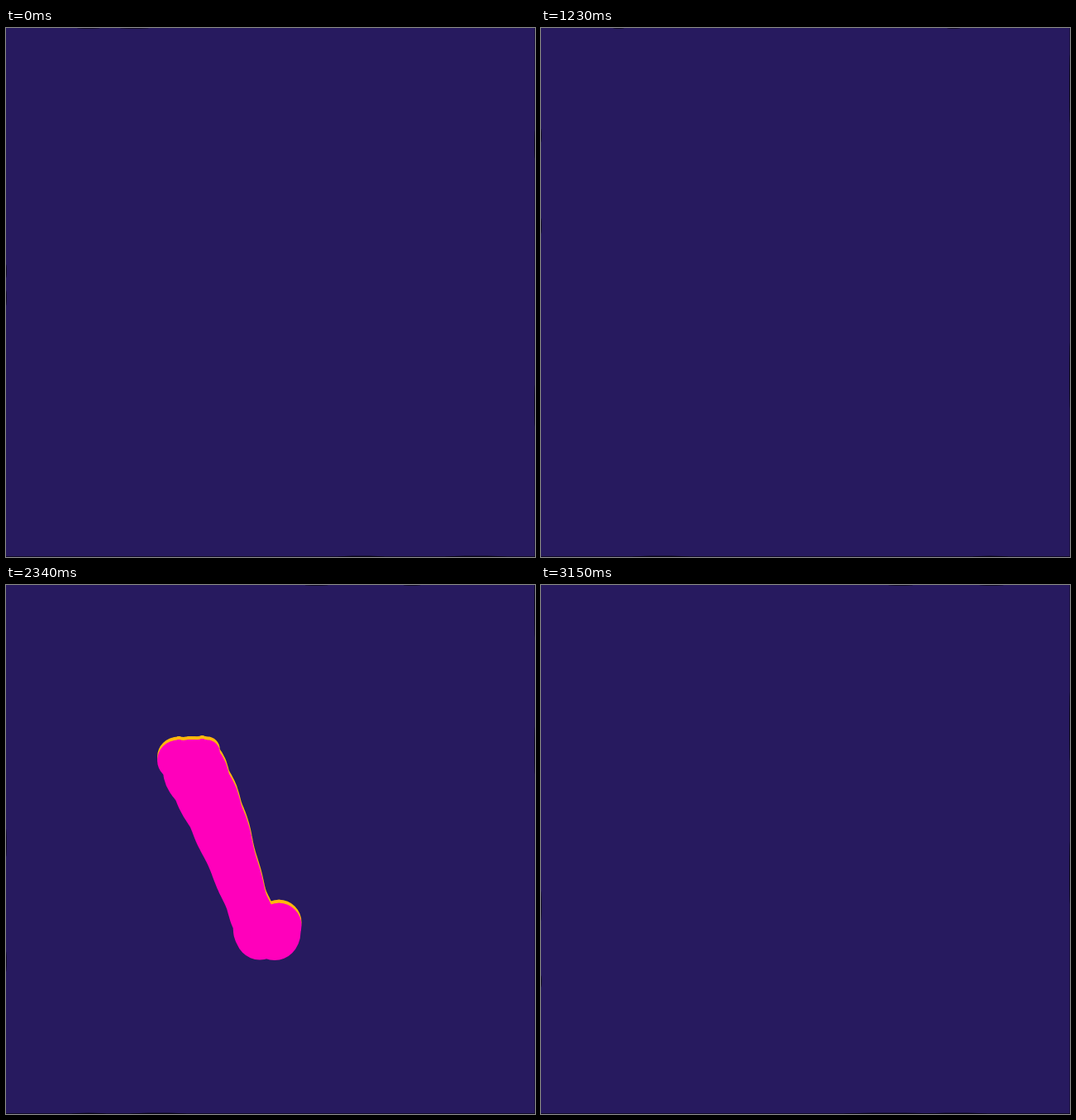
These frames come from a looping animation (640x640 px, 3180 ms). An HTML page with a canvas:

```html
<!DOCTYPE html>
<html lang="en">
<head>
<meta charset="utf-8">
<title>Brush letters</title>
<style>
html, body { margin: 0; width: 100%; height: 100%; overflow: hidden; background: #271a5f; }
canvas { display: block; width: 640px; height: 640px; }
</style>
</head>
<body>
<canvas id="stage" width="640" height="640"></canvas>
<script>
const SIZE = 640, LOOP = 3180, STEP = 30, SPAN = 120;
const INK = '#ff00bb', RIM = '#ffb80c', BACK = '#271a5f', EDGE = 'rgba(0, 0, 0, 0.6)';
const ctx = document.getElementById('stage').getContext('2d');

const clamp = v => Math.max(0, Math.min(1, v));
const ease = v => v * v * (3 - 2 * v);

// A brush stroke: when it starts to appear and to leave, its rim shift,
// and the spine as [x, y, radius].
const stroke = (appear, leave, shift, ...spine) => ({ appear, leave, shift, spine });

const strokes = [
  // Y: first dabs of the left arm
  stroke(360, 510, [3, -5], [129, 87, 5], [157, 123, 12]),
  stroke(360, 510, [1, -5], [180, 187, 20], [183, 197, 20]),
  stroke(360, 510, [2, -4], [203, 156, 18], [231, 185, 20], [253, 254, 13]),
  // Y: left arm, joint, right arm, stem
  stroke(480, 690, [2, -4], [133, 90, 10], [190, 165, 28], [335, 345, 28]),
  stroke(600, 690, [-1, -4], [350, 330, 22], [345, 390, 20]),
  stroke(540, 840, [-2, -4], [457, 114, 13], [438, 143, 31], [405, 205, 38], [390, 245, 35], [355, 328, 16]),
  stroke(540, 840, [0, -4], [471, 151, 13], [435, 180, 25]),
  stroke(630, 840, [0, -9], [331, 378, 12], [340, 415, 17]),
  stroke(630, 840, [0, -9], [355, 378, 15], [340, 415, 17]),
  // V: cap, left arm, right arm
  stroke(2160, 2640, [0, -4], [207, 212, 24], [243, 203, 16]),
  stroke(2190, 2640, [0, -4], [228, 225, 38], [256, 285, 34], [291, 383, 26], [307, 424, 30]),
  stroke(2310, 2760, [0, -4], [325, 424, 30], [341, 385, 26], [378, 283, 35], [399, 215, 37])
];

// Smooth curve through the spine, u from 0 to 1.
function along(spine, u) {
  const last = spine.length - 1;
  const i = Math.min(Math.floor(u * last), last - 1);
  const f = u * last - i;
  const at = k => spine[Math.max(0, Math.min(last, k))];
  return [0, 1, 2].map(n => {
    const [a, b, c, d] = [-1, 0, 1, 2].map(k => at(i + k)[n]);
    return b + f / 2 * (c - a + f * (2 * a - 5 * b + 4 * c - d + f * (3 * (b - c) + d - a)));
  });
}

function paint({ appear, leave, spine }, t, color, [dx, dy]) {
  if (t <= appear || t >= leave + SPAN) return;
  const from = ease(clamp((t - leave) / SPAN));
  const to = ease(clamp((t - appear) / SPAN));
  const dabs = 40 * spine.length;
  ctx.fillStyle = color;
  ctx.beginPath();
  for (let i = 0; i <= dabs; i++) {
    const u = from + (to - from) * i / dabs;
    const [x, y, r] = along(spine, u);
    const wobble = Math.sin(u * 9 * spine.length) * r / 50;
    ctx.moveTo(x + dx + r, y + dy);
    ctx.arc(x + dx, y + dy, r + wobble, 0, Math.PI * 2);
  }
  ctx.fill();
}

function random(seed) {
  return () => {
    seed = (seed * 1664525 + 1013904223) >>> 0;
    return seed / 4294967296;
  };
}

// Rough paper edge, new on every step.
function drawEdge(t) {
  const rnd = random(t * 7919 + 17);
  const sliver = (x, y, rx, ry) => {
    ctx.beginPath();
    ctx.ellipse(x, y, rx, ry, 0, 0, Math.PI * 2);
    ctx.fill();
  };
  ctx.fillStyle = EDGE;
  ctx.fillRect(0, SIZE - 1, SIZE, 1);
  ctx.fillRect(SIZE - 0.5, 0, 0.5, SIZE);
  for (let i = 0; i < 2; i++) {
    sliver(rnd() * SIZE, 0, 6 + rnd() * 14, 1);
    sliver(0, rnd() * SIZE, 1, 4 + rnd() * 14);
    sliver(SIZE, rnd() * SIZE, 1, 15 + rnd() * 30);
    sliver(rnd() * SIZE, SIZE, 20 + rnd() * 40, 1.5);
  }
}

// Faint leftovers of the erased left arm.
function drawScratches(t) {
  if (t < 780 || t > 840) return;
  ctx.strokeStyle = 'rgba(170, 65, 125, 0.5)';
  ctx.lineWidth = 1;
  for (let i = 0; i < 3; i++) {
    const x = 203 + 45 * i, y = 201 + 18 * i * i;
    const angle = -0.5 - 0.6 * i, half = 12 / (i + 1);
    const dx = Math.cos(angle) * half, dy = Math.sin(angle) * half;
    ctx.beginPath();
    ctx.moveTo(x - dx, y - dy);
    ctx.lineTo(x + dx, y + dy);
    ctx.stroke();
  }
}

function draw(t) {
  ctx.fillStyle = BACK;
  ctx.fillRect(0, 0, SIZE, SIZE);
  drawEdge(t);
  drawScratches(t);
  strokes.forEach(s => paint(s, t, RIM, s.shift));
  strokes.forEach(s => paint(s, t, INK, [0, 0]));
}

const start = performance.now();
let shown = -1;
function tick() {
  const t = Math.floor(((performance.now() - start) % LOOP) / STEP) * STEP;
  if (t !== shown) draw(shown = t);
  requestAnimationFrame(tick);
}
tick();
</script>
</body>
</html>
```
